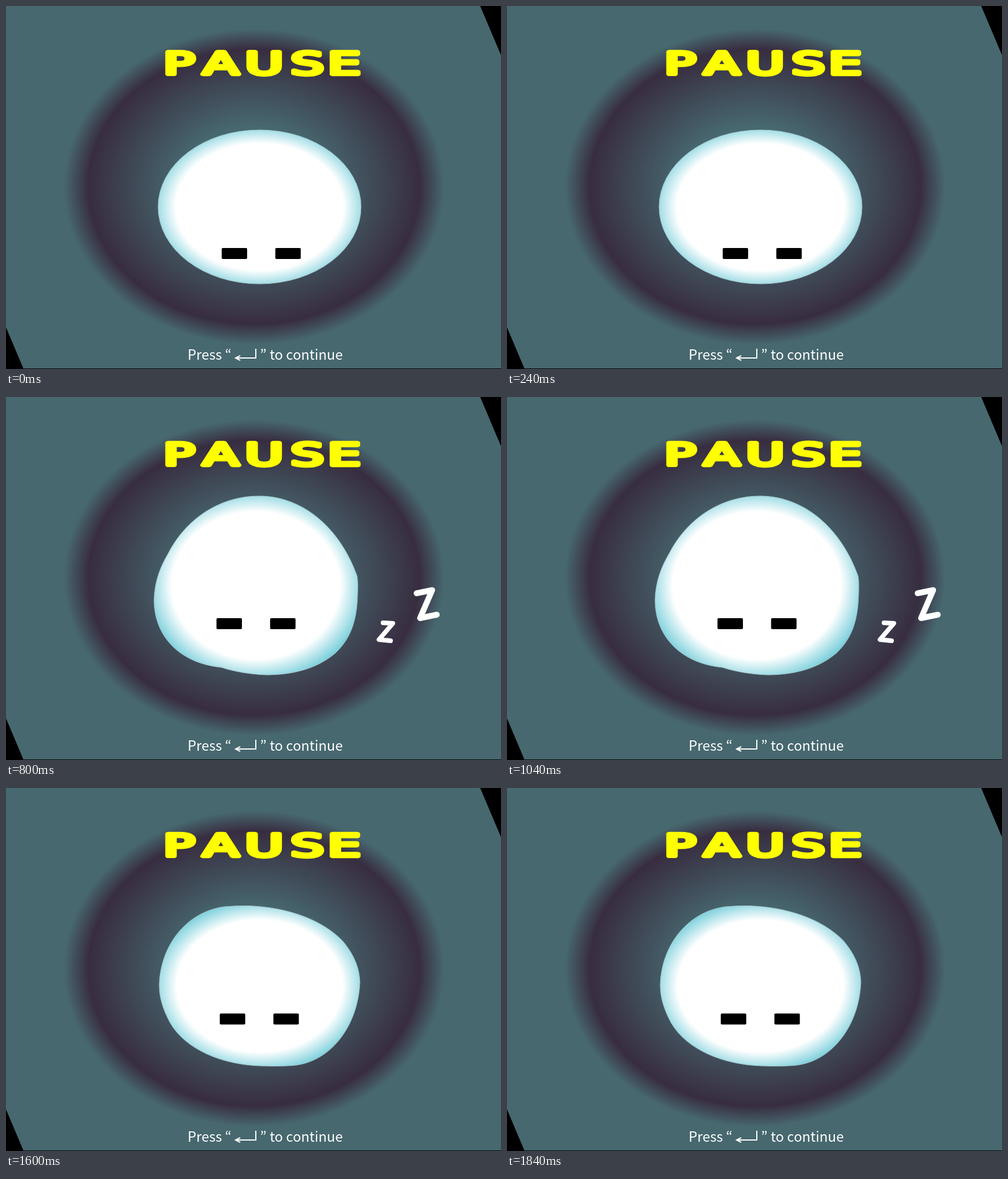
Animation, 856 px wide and 627 px high, one loop 2000 ms. Source, as an HTML page:

```html
<!DOCTYPE html>
<html lang="en">
<head>
<meta charset="utf-8">
<title>Pause</title>
<style>
  html, body { margin: 0; width: 100%; height: 100%; overflow: hidden; background: #000; }
  svg { display: block; width: 856px; height: 627px; }
  .title {
    font: 54px "DejaVu Sans", sans-serif; text-anchor: middle;
    fill: #ff0; stroke: #ff0; stroke-width: 6.5; stroke-linejoin: round;
  }
  .hint { font: 300 23.8px "Noto Sans CJK JP", "Noto Sans CJK SC", "Open Sans", sans-serif; fill: #fff; }
  .line { fill: none; stroke: #fff; }
  .sleep { stroke-linecap: round; stroke-linejoin: round; }
</style>
</head>
<body>
<svg viewBox="0 0 856 627">
  <defs>
    <radialGradient id="halo">
      <stop offset=".38" stop-color="#47686f"/>
      <stop offset=".87" stop-color="#382d40"/>
      <stop offset="1" stop-color="#47686f"/>
    </radialGradient>
    <radialGradient id="skin" r=".55">
      <stop offset=".75" stop-color="#fff"/>
      <stop offset="1" stop-color="#6fcbd8"/>
    </radialGradient>
  </defs>

  <path fill="#47686f" d="M0 0H820L856 85V626H30L0 555Z"/>
  <ellipse cx="429" cy="312" rx="329" ry="273" fill="url(#halo)"/>

  <!-- Wide title face -->
  <g transform="scale(1.68 1)">
    <text class="title" x="178.2 221.1 265.8 310.1 348.1" y="118">PAUSE</text>
  </g>

  <path id="body" fill="url(#skin)" stroke="#a3c0c6"/>
  <g id="eyes">
    <rect width="44" height="19" rx="2"/>
    <rect x="92.7" width="44" height="19" rx="2"/>
  </g>

  <g class="line sleep" id="snores">
    <path stroke-width="8" d="M652 390L669 391L645 419L665 421"/>
    <path stroke-width="10" d="M710 339L737 333.5L716 382L745 376"/>
    <path stroke-width="12" d="M709 213L745 194L735 267L772 247"/>
  </g>

  <text class="hint" x="314" y="611">Press “</text>
  <path class="line" stroke-width="2" d="M432 592V608H397M405 604L397 608L405 612"/>
  <text class="hint" x="582.5" y="611" text-anchor="end">” to continue</text>
</svg>

<script>
const POSE_MS = 400;
const poses = [
  { eyes: [373, 418], snores: 0,
    body: "M263 347A175.5 133 0 0 1 614 347A175.5 133 0 0 1 263 347Z" },
  { eyes: [377, 394], snores: 1,
    body: "M443 231C510 230 572 286 600 334Q605 343 605 352C603 388 582 425 556 440C527 455 490 462 452 462C412 461 378 453 345 441C303 430 272 397 272 358C273 338 281 323 292 313C322 289 353 268 385 250C405 238 424 231 443 231Z" },
  { eyes: [364, 382], snores: 2,
    body: "M438 171C508 171 575 220 607 309Q609 318 608 340C607 385 597 416 570 442C535 472 490 480 450 480C424 479 397 475 372 467C302 460 256 415 256 350C257 318 267 293 280 271C310 212 368 171 438 171Z" },
  { eyes: [370.3, 427], snores: 3,
    body: "M468 247Q487 248 503 253C560 262 584 320 580 381C585 402 584 412 580 426C564 467 503 494 430 494Q402 493 379 489C329 468 294 418 294 371C295 347 304 327 319 314C354 278 410 247 468 247Z" },
  { eyes: [369.7, 389.5], snores: 0,
    body: "M378 205Q398 203 420 203.5C485 206 545 226 582 264C602 288 611 310 612 335C609 412 560 476 493 479.5Q472 481 440 480C374 478 311 452 284 406C270 380 265 360 265 340C267 270 314 213 378 205Z" },
];

const body = document.getElementById("body");
const eyes = document.getElementById("eyes");
const snores = [...document.getElementById("snores").children];
const start = performance.now();

function draw() {
  const elapsed = performance.now() - start;
  const pose = poses[Math.floor(elapsed / POSE_MS) % poses.length];
  body.setAttribute("d", pose.body);
  eyes.setAttribute("transform", `translate(${pose.eyes})`);
  snores.forEach((z, i) => z.setAttribute("visibility", i < pose.snores ? "visible" : "hidden"));
  requestAnimationFrame(draw);
}
draw();
</script>
</body>
</html>
```
